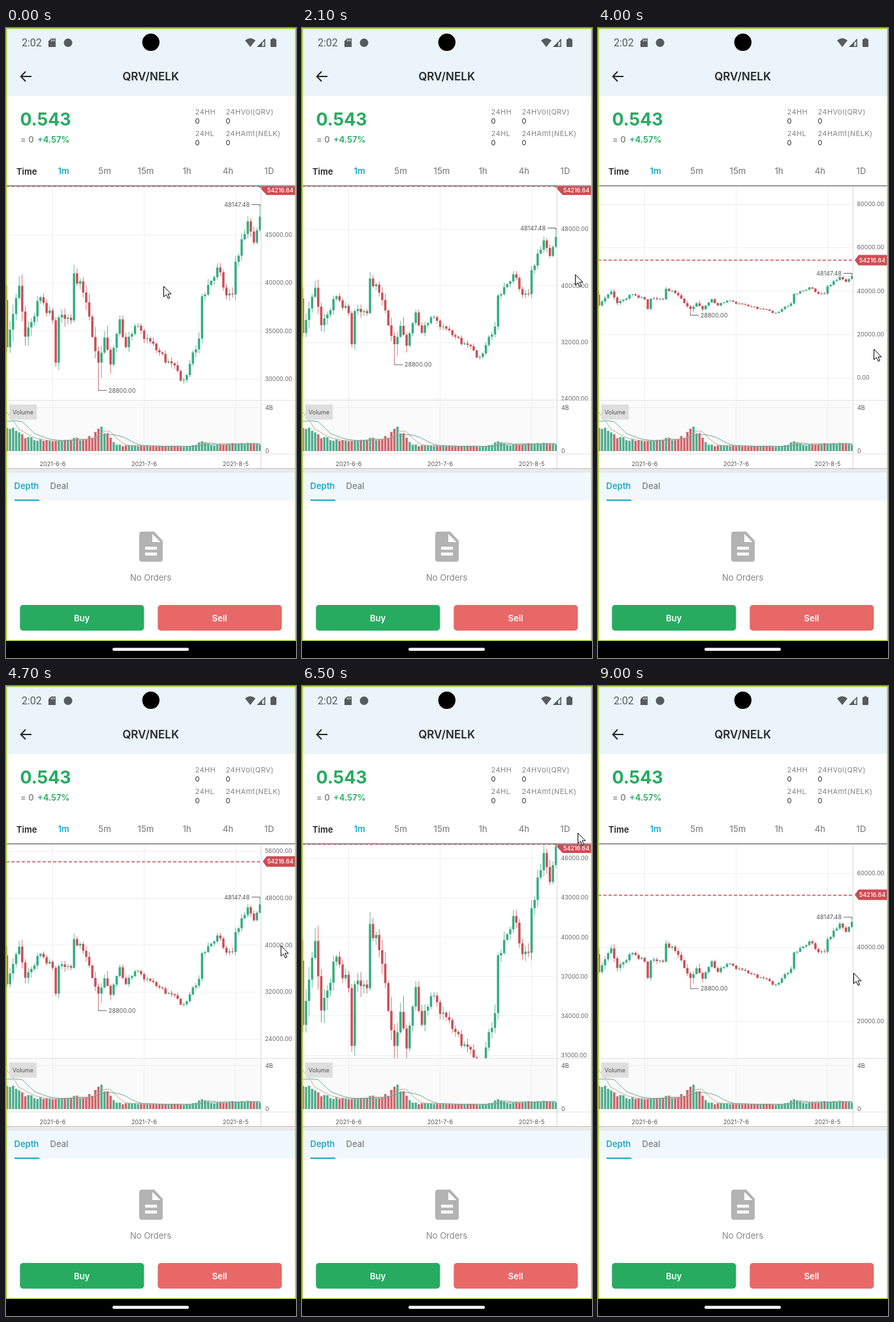
These frames come from a looping animation (444x962 px, 9900 ms). An HTML page with a canvas:

```html
<!DOCTYPE html>
<html lang="en">
<head>
<meta charset="utf-8">
<title>Price chart</title>
<style>
html, body { margin: 0; width: 100%; height: 100%; overflow: hidden; background: #fff; }
canvas { display: block; width: 444px; height: 962px; }
</style>
</head>
<body>
<canvas id="stage" width="444" height="962"></canvas>
<script>
const ctx = document.getElementById('stage').getContext('2d');
const LOOP = 9900, STEP = 100, COUNT = 84, LAST = 54216.64, HIGH = 48147.48, LOW = 28800;
const UP = '#35ad82', DOWN = '#cc4e56', BLUE = '#1ba9c6', GREEN = '#27ab60', GREY = '#858585', DARK = '#26292b';

let seed = 7;
const random = () => (seed = seed * 16807 % 2147483647) / 2147483647;

// Linear path through rows of [position, ...values], held at both ends.
function along(rows, at) {
  const n = rows.findIndex(row => row[0] > at);
  if (n < 1) return rows.at(n).slice(1);
  const a = rows[n - 1], b = rows[n], f = (at - a[0]) / (b[0] - a[0]);
  return a.map((v, i) => v + (b[i] - v) * f).slice(1);
}

// Turning points of the market: day, close in hundreds
const turns = [[0, 333], [4, 397], [6, 344], [11, 385], [15, 361], [16, 317], [17, 364], [21, 361],
  [22, 410], [25, 390], [30, 317], [32, 343], [34, 315], [37, 362], [39, 333], [42, 355], [58, 299],
  [63, 342], [64, 386], [69, 416], [72, 387], [74, 388], [75, 422], [79, 464], [81, 442], [83, 469]];

// Trading fades from a peak, with later bursts: day, size, width
const bursts = [[24, 10, 9], [31, 20, 3], [64, 9, 2], [77, 4, 8]];
const activity = i => bursts.reduce((sum, [day, size, width]) =>
  sum + size * Math.exp(-(((i - day) / width) ** 2)), 7.5 + 34 * Math.exp(-i / 7));

let previous = 382;
const candles = Array.from({ length: COUNT }, (_, i) => {
  const volume = activity(i) * (.85 + random() * .3);
  const wick = () => 1 + random() * volume * .45;
  const jitter = turns.some(([day]) => day === i) ? 0 : (random() - .5) * 10;
  const open = previous, close = along(turns, i)[0] + jitter;
  previous = close;
  return { x: 1.5 + i * 14 / 3, open, close, volume, up: close >= open,
    high: i === COUNT - 1 ? HIGH / 100 : Math.max(open, close) + wick(),
    low: i === 30 ? LOW / 100 : Math.min(open, close) - wick() };
});

// time, cursor x, cursor y, pixels per 100000 price units
const drag = [[500, 241, 394, 1466.7], [1300, 418, 321, 1466.7], [2100, 418, 376, 1078.3],
  [2500, 419, 389, 987], [4000, 422, 490, 331], [5400, 419, 302, 1462], [6300, 422, 217, 2050],
  [6500, 422, 224, 2003], [7800, 428, 414, 868], [8500, 423, 452, 597], [8700, 421, 457, 563.5],
  [8800, 421, 457, 563.5], [9000, 391, 438, 563.5]];

function rect(x, y, w, h, color) { ctx.fillStyle = color; ctx.fillRect(x, y, w, h); }
function round(x, y, w, h, r, color) {
  ctx.fillStyle = color; ctx.beginPath(); ctx.roundRect(x, y, w, h, r); ctx.fill();
}
function disc(x, y, r, color) {
  ctx.fillStyle = color; ctx.beginPath(); ctx.arc(x, y, r, 0, 7); ctx.fill();
}
function trace(points) {
  ctx.beginPath();
  points.forEach(([x, y]) => ctx.lineTo(x, y));
}
function line(points, color, width = 1) {
  trace(points); ctx.strokeStyle = color; ctx.lineWidth = width; ctx.stroke();
}
function shape(points, color) { trace(points); ctx.closePath(); ctx.fillStyle = color; ctx.fill(); }
function text(s, x, y, size, color, weight = 400, align = 'left', spacing = 0, family = 'Inter') {
  ctx.font = `${weight} ${size}px ${family}, sans-serif`;
  ctx.letterSpacing = spacing + 'px';
  ctx.textAlign = align;
  ctx.fillStyle = color;
  ctx.fillText(s, x, y);
}

function header() {
  const back = '#eaf4f9', icon = '#565b5e';
  rect(0, 0, 444, 104, back);
  text('2:02', 24, 28, 16, icon, 400, 'left', 0, 'Roboto');
  shape([[69, 16], [76, 16], [76, 29], [65, 29], [65, 20]], icon);
  for (let x = 69; x < 75; x += 2.3) rect(x, 17.5, 1, 3, back);
  disc(95, 22.5, 6.5, icon);
  disc(221.8, 21.8, 13.2, '#000');
  ctx.beginPath(); ctx.moveTo(374, 29); ctx.lineTo(366, 19);
  ctx.quadraticCurveTo(374, 12, 382, 19); ctx.fillStyle = icon; ctx.fill();
  shape([[397, 16], [397, 29], [384, 29]], icon);
  shape([[395.5, 19.5], [395.5, 27.5], [392, 27.5], [392, 23]], '#d5dde1');
  round(405, 17, 9, 12, 1, icon);
  rect(407.5, 15.5, 4, 2, icon);
  line([[39, 74], [23, 74]], DARK, 2);
  line([[30, 66.5], [22.7, 74], [30, 81.5]], DARK, 2);
  text('QRV/NELK', 221.5, 80, 17, DARK, 600, 'center');
}

function summary() {
  text('0.543', 21.5, 149, 26.8, GREEN, 700);
  text('= 0', 22, 175, 13, '#777', 500);
  text('+4.57%', 48, 175, 13, GREEN, 600);
  [['24HH', 290, 132], ['24HVol(QRV)', 337, 132], ['24HL', 290, 165], ['24HAmt(NELK)', 337, 165]]
    .forEach(([label, x, y]) => {
      text(label, x - .5, y, 11, GREY, 400, 'left', .4);
      text('0', x - .5, y + 14, 11, '#222');
    });
  text('Time', 16, 224, 13, '#222', 600);
  ['1m', '5m', '15m', '1h', '4h', '1D'].forEach((s, i) =>
    text(s, 88 + i * 63, 223, 13, i ? GREY : BLUE, i ? 500 : 600, 'center'));
}

// Moving average; the days before the chart end in a burst of trading.
function average(span) {
  return candles.map(({ x }, i) => {
    let sum = 0;
    for (let j = i - span + 1; j <= i; j++) sum += j < 0 ? (j > -5 ? 65 : 32) : candles[j].volume;
    return [x, 646 - sum / span];
  });
}

function dayLines(top, bottom) {
  for (let x = 71.5; x < 390; x += 140) line([[x, top], [x, bottom]], '#efefef');
}

function volumePane() {
  rect(0, 569, 390, 82, '#fafafa');
  dayLines(569, 651);
  line([[0, 579.5], [390, 579.5]], '#efefef');
  candles.forEach(({ x, volume, up }) => rect(x - 1.75, 646 - volume, 3.5, volume, up ? '#4fae8d' : '#d0636b'));
  line(average(5), '#c2a88b');
  line(average(10), '#62aaa2');
  line([[0, 568.5], [444, 568.5]], '#e2e2e2');
  line([[0, 650.5], [444, 650.5]], '#e2e2e2');
  rect(5, 575, 42, 23, '#dedede');
  text('Volume', 26, 590, 9, '#555', 400, 'center');
  text('4B', 397, 583, 9, '#555');
  text('0', 397, 649, 9, '#555');
  ['2021-6-6', '2021-7-6', '2021-8-5'].forEach((s, i) => text(s, 71.5 + i * 140, 669, 9, '#555', 400, 'center'));
}

function gridStep(scale, t) {
  if (scale > .0113) return t < 2100 ? 5000 : 3000;
  return scale > .0065 ? 8000 : 20000;
}

function pricePane(scale, t) {
  const yOf = p => 405.1 - scale * (p - 38912);
  ctx.save();
  ctx.beginPath(); ctx.rect(0, 242, 444, 326.5); ctx.clip();
  dayLines(242, 569);
  const step = gridStep(scale, t);
  for (let k = -8; k <= 8; k++) {
    const price = 40000 + k * step, y = yOf(price), gridY = Math.round(y) + .5;
    line([[0, gridY], [390, gridY]], '#efefef');
    text(price.toFixed(2), 396.5, y + 3.2, 9, '#666');
  }
  candles.forEach(({ x, open, close, high, low, up }) => {
    const color = up ? UP : DOWN, top = yOf(Math.max(open, close) * 100);
    rect(x - .4, yOf(high * 100), .8, scale * (high - low) * 100, color);
    rect(x - 1.75, top, 3.5, Math.max(1, scale * Math.abs(close - open) * 100), color);
  });
  const hi = yOf(HIGH), lo = yOf(LOW);
  line([[376, hi], [388.8, hi], [388.8, hi + 2]], '#666');
  text(HIGH.toFixed(2), 373, hi + 3.2, 9, '#555', 400, 'right');
  line([[141.5, lo - 2], [141.5, lo], [154, lo]], '#666');
  text(LOW.toFixed(2), 157, lo + 3.2, 9, '#555');
  ctx.restore();
  lastPrice(yOf(LAST));
}

function lastPrice(y) {
  const clamped = y < 243, lineY = clamped ? 241.8 : Math.round(y) + .5;
  ctx.setLineDash([5, 3]);
  line([[0, lineY], [390, lineY]], '#cf4c54', 1.3);
  ctx.setLineDash([]);
  line([[0, 241], [444, 241]], '#777', 1.5);
  shape(clamped ? [[387, 242], [444, 242], [444, 255], [399, 255]]
    : [[393, y], [399, y - 8], [444, y - 8], [444, y + 8], [399, y + 8]], '#cf4c54');
  text(LAST.toFixed(2), 400, (clamped ? 248 : y) + 3.4, 9, '#fff', 500);
}

function footer() {
  line([[0, 672.5], [444, 672.5]], '#bdbdbd');
  rect(0, 673, 444, 6, '#e9e9e9');
  rect(0, 679, 444, 42.5, '#f0f8fe');
  text('Depth', 12.5, 704, 13, BLUE, 600);
  text('Deal', 67.5, 704, 13, '#7d7d7d', 500);
  rect(13, 720, 38, 2, BLUE);
  ctx.fillStyle = '#b3b3b3';
  ctx.beginPath(); ctx.roundRect(204, 769, 36, 46, 4); ctx.fill();
  shape([[226, 768], [241, 768], [241, 784]], '#fff');
  shape([[224, 772.5], [224, 785], [236.5, 785]], '#fff');
  rect(213, 792, 18, 4.5, '#fff');
  rect(213, 801, 18, 4.5, '#fff');
  text('No Orders', 221.5, 844, 13, GREY, 400, 'center');
  round(21.3, 881, 190, 39.3, 5, GREEN);
  round(232.3, 881, 190, 39.3, 5, '#e86868');
  text('Buy', 116, 906, 13, '#fff', 600, 'center');
  text('Sell', 327, 906, 13, '#fff', 600, 'center');
  ctx.strokeStyle = '#a9d136'; ctx.lineWidth = 1.5;
  ctx.strokeRect(.75, .75, 442.5, 934.5);
  rect(0, 936, 444, 26, '#000');
  round(163, 946.5, 117, 4.5, 2.2, '#fff');
}

function cursor(x, y) {
  const points = [[0, 0], [0, 16], [3.8, 12.6], [6.6, 18.6], [9, 17.5], [6.4, 11.7], [11.4, 11.7], [0, 0]]
    .map(([dx, dy]) => [x + .5 + dx, y + .5 + dy]);
  shape(points, '#fff');
  line(points, '#000');
}

function draw(now) {
  const t = Math.floor(now % LOOP / STEP) * STEP;
  const [x, y, zoom] = along(drag, t);
  rect(0, 0, 444, 962, '#fff');
  header();
  summary();
  volumePane();
  pricePane(zoom / 1e5, t);
  line([[390.5, 242], [390.5, 672]], '#d8d8d8');
  footer();
  cursor(x, y);
  requestAnimationFrame(draw);
}
draw(0);
</script>
</body>
</html>
```
